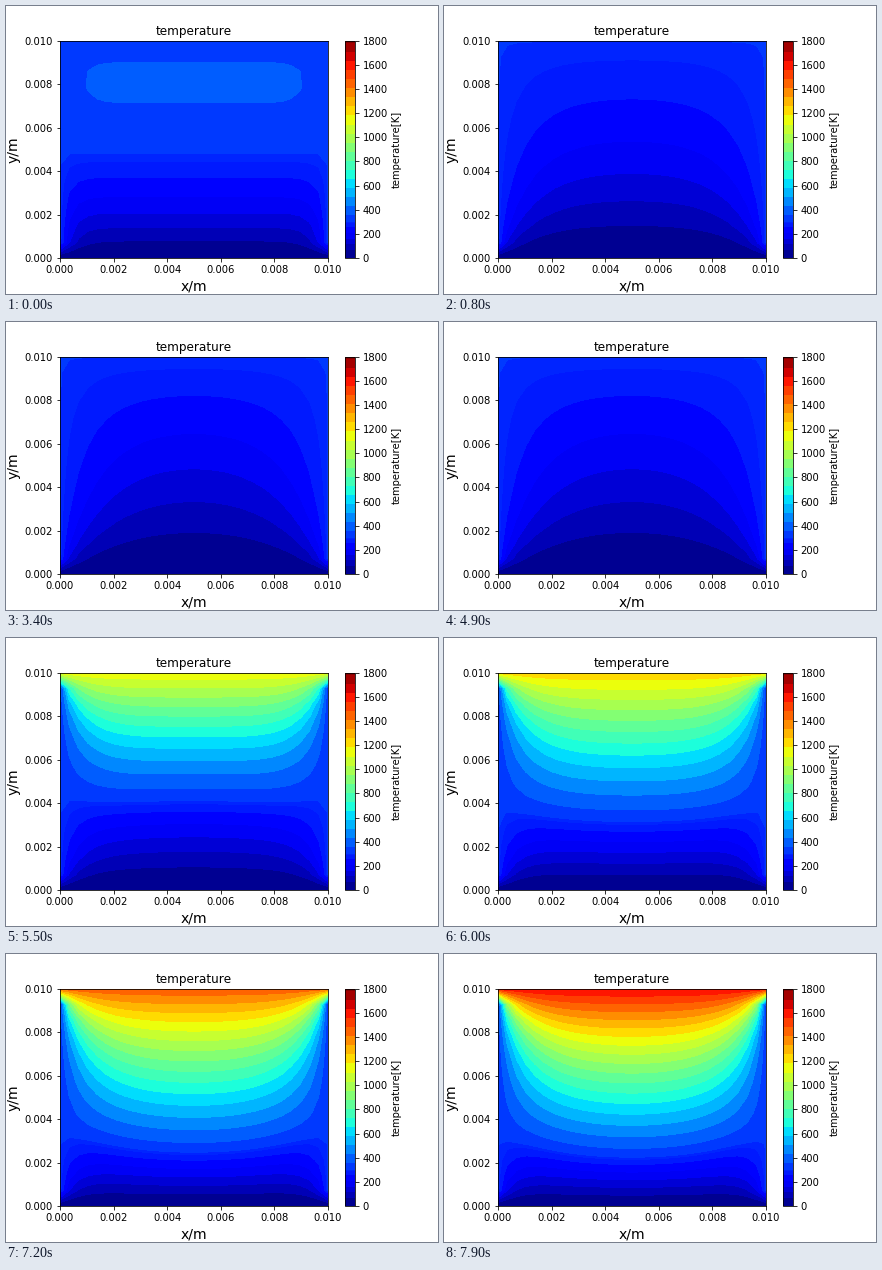
Animation, 432 px wide and 288 px high, one loop 8000 ms. Source, as a matplotlib script:

```python
import numpy as np
import matplotlib.pyplot as plt
from matplotlib.animation import FuncAnimation

FRAMES, STEPS = 80, 16
NX, NY = 30, 15
WALL, T_MAX = 300.0, 1800
HEAT_ON = 49.05        # time in frames when the top edge is switched on
LAMBDA = 3.5 / STEPS   # diffusion number of one substep

LEVELS = [0, *range(66, 260, 47), 286, 299.5, *range(355, T_MAX, 75), T_MAX]

x = np.linspace(0, 0.01, NX)
y = np.linspace(0, 0.01, NY)


def lid(t):
    """Temperature of the top edge: cooling down, later heated ever faster."""
    if t < HEAT_ON:
        return WALL + 40 * max(0, 1 - t / 4)
    s = t - 50
    return 1100 + 11 * s + 0.25 * s * s


def set_edges(T, t):
    T[:, 0] = T[:, -1] = WALL
    T[0] = 0
    T[-1] = lid(t)


def start_field():
    """Warm parabola in height, flat across and falling to the walls."""
    up = 360 * (1 - (1 - np.linspace(0, 1, NY) / 0.81) ** 2)
    across = 1 - np.linspace(-1, 1, NX) ** 12
    T = WALL + np.outer(up - WALL, across)
    set_edges(T, 0)
    return T


def solve():
    T = start_field()
    fields = [T.copy()]
    for n in range(1, FRAMES):
        for k in range(STEPS):
            lap = (T[1:-1, 2:] + T[1:-1, :-2] + T[2:, 1:-1] + T[:-2, 1:-1]
                   - 4 * T[1:-1, 1:-1])
            T[1:-1, 1:-1] += LAMBDA * lap
            set_edges(T, n - 1 + (k + 1) / STEPS)
        fields.append(T.copy())
    return fields


def draw_field(T):
    return ax.contourf(x, y, T, levels=LEVELS, cmap="jet", vmin=0, vmax=T_MAX)


fields = solve()

plt.rcParams["font.family"] = "DejaVu Sans"
plt.rcParams["text.kerning_factor"] = 6
fig, ax = plt.subplots(figsize=(6, 4), dpi=72)
fig.subplots_adjust(left=0.125, right=0.9, bottom=0.125, top=0.88)

contours = draw_field(fields[0])
bar = fig.colorbar(contours, ax=ax, spacing="proportional",
                   ticks=range(0, T_MAX + 1, 200))
bar.minorticks_off()
bar.set_label("temperature[K]", fontsize=10)

ax.set_title("temperature", fontsize=12)
ax.set_xlabel("x/m", fontsize=14)
ax.set_ylabel("y/m", fontsize=14)
ticks = np.linspace(0, 0.01, 6)
labels = [f"{v:.3f}" for v in ticks]
ax.set_xticks(ticks, labels)
ax.set_yticks(ticks, labels)
ax.set_xlim(0, 0.01)
ax.set_ylim(0, 0.01)


def update(n):
    global contours
    contours.remove()
    contours = draw_field(fields[n])
    return []


anim = FuncAnimation(fig, update, frames=FRAMES, interval=100,
                     repeat=True, repeat_delay=0, blit=False)
plt.show()
```
